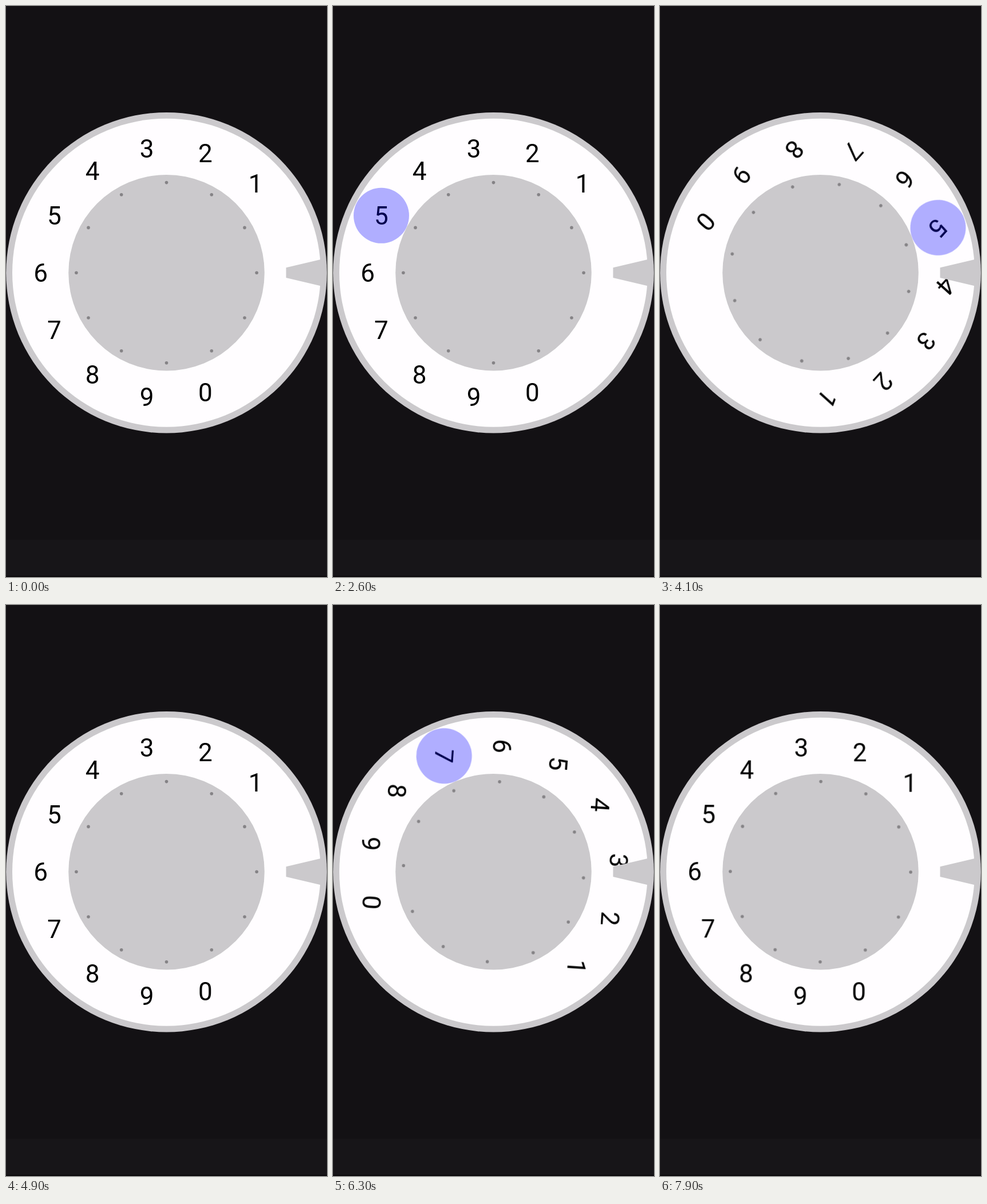
Animation, 561 px wide and 998 px high, one loop 8 s. Source, as an HTML page:

```html
<!DOCTYPE html>
<html lang="en">
<head>
<meta charset="utf-8">
<title>Rotary dial</title>
<style>
  html, body { margin: 0; width: 100%; height: 100%; overflow: hidden; background: #131114; }
  svg { display: block; width: 100%; height: 100%; }
  #dial { transform-origin: 280.5px 466.2px; }
  text { font: 44px Roboto, sans-serif; text-anchor: middle; fill: #000; }
  .grey { fill: #cbc9cc; }
  .dot { fill: #858386; }
  .touch { fill: #00f; fill-opacity: .31; opacity: 0; }
</style>
</head>
<body>
<svg viewBox="0 0 561 998">
  <rect width="561" height="998" fill="#131114"/>
  <rect y="933" width="561" height="65" fill="#171518"/>
  <rect y="996" width="561" height="2" fill="#0a080a"/>
  <circle class="grey" cx="280.5" cy="466.2" r="280.3"/>
  <circle cx="280.5" cy="466.2" r="269.5" fill="#fffdff"/>
  <circle class="grey" cx="280.5" cy="466.2" r="171.3"/>
  <g id="dial"></g>
  <path class="grey" d="M489.5 457.3 551 442.8V489.6L489.5 475.1Z"/>
</svg>
<script>
const CX = 280.5, CY = 466.2, LOOP = 8000, STEP = 100, BACK = 400;
const dial = document.getElementById('dial');

// One entry per dialled digit: touch time, drag path [ms, degrees], spring-back start, touch end
const calls = [
  { digit: 1, on: 500, off: 1600, release: 1483,
    drag: [[750, 0], [800, 3], [900, 12], [1000, 21], [1100, 27]] },
  { digit: 5, on: 2600, off: 4500, release: 4450,
    drag: [[2850, 0], [3000, 9], [3300, 48], [3600, 85.4], [3700, 96], [3900, 116], [4100, 132], [4200, 135]] },
  { digit: 7, on: 5500, off: 7600, release: 7518,
    drag: [[5750, 0], [5900, 16], [6100, 57], [6300, 93.9], [6600, 143], [6800, 167], [7000, 182], [7200, 189]] }
];

function add(tag, attrs, label) {
  const el = document.createElementNS('http://www.w3.org/2000/svg', tag);
  for (const k in attrs) el.setAttribute(k, attrs[k]);
  if (label !== undefined) el.textContent = label;
  return dial.appendChild(el);
}

function polar(deg, r) {
  const a = deg * Math.PI / 180;
  return [CX + r * Math.cos(a), CY - r * Math.sin(a)];
}

const digitAt = n => polar(18 + 27 * n, 220);

// cubic-bezier(.4, 0, .2, 1)
function ease(x) {
  let lo = 0, hi = 1;
  for (let i = 0; i < 30; i++) {
    const s = (lo + hi) / 2, q = 1 - s;
    if (1.2 * s * q * q + 0.6 * s * s * q + s ** 3 < x) lo = s; else hi = s;
  }
  return lo * lo * (3 - 2 * lo);
}

function along(points, t) {
  for (let i = 1; i < points.length; i++) {
    const [t0, a] = points[i - 1], [t1, b] = points[i];
    if (t < t1) return a + (b - a) * Math.max(0, (t - t0) / (t1 - t0));
  }
  return points[points.length - 1][1];
}

function angle(t) {
  for (const c of calls) {
    if (t < c.drag[0][0] || t >= c.release + BACK) continue;
    const turned = along(c.drag, t);
    return t < c.release ? turned : turned * (1 - ease((t - c.release) / BACK));
  }
  return 0;
}

// Samples a value of time into hard steps that loop forever
function play(el, frame) {
  const frames = [];
  for (let t = 0; t <= LOOP; t += STEP) {
    frames.push({ ...frame(t % LOOP), offset: t / LOOP, easing: 'step-end' });
  }
  el.animate(frames, { duration: LOOP, iterations: Infinity });
}

for (let i = 0; i < 12; i++) {
  const [cx, cy] = polar(30 * i, 157.6);
  add('circle', { class: 'dot', cx, cy, r: 2.8 });
}
for (let n = 1; n <= 10; n++) {
  const [x, y] = digitAt(n);
  add('text', { x, y: y + 15.6 }, n % 10);
}
for (const c of calls) {
  const [cx, cy] = digitAt(c.digit);
  const touch = add('circle', { class: 'touch', cx, cy, r: 48.5 });
  play(touch, t => ({ opacity: t >= c.on && t < c.off ? 1 : 0 }));
}
play(dial, t => ({ transform: `rotate(${angle(t).toFixed(3)}deg)` }));
</script>
</body>
</html>
```
